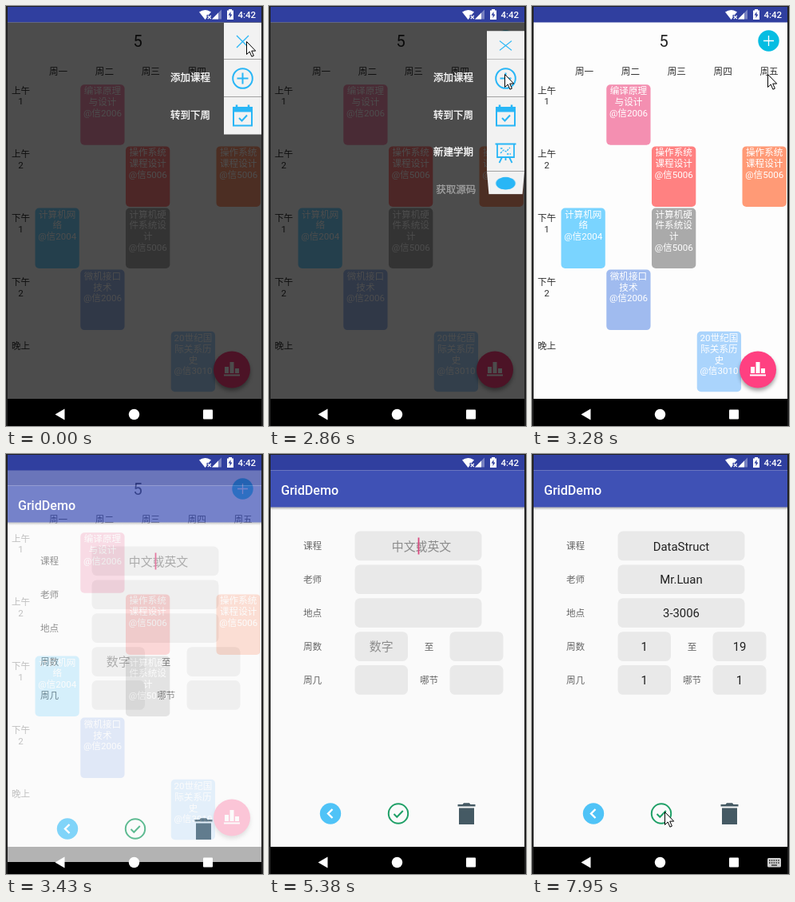
Animation, 322 px wide and 525 px high, one loop 8 s. Source, as an HTML page:

```html
<!DOCTYPE html>
<html lang="zh-CN">
<head>
<meta charset="utf-8">
<title>Timetable</title>
<style>
@property --fold { syntax: "<number>"; inherits: true; initial-value: 0; }
html, body { margin: 0; width: 100%; height: 100%; overflow: hidden; background: #222; }
#stage { position: absolute; left: 0; top: 0; width: 322px; height: 525px; overflow: hidden;
  font-family: Roboto, "Noto Sans CJK SC", "Noto Sans CJK", sans-serif; }
svg { position: absolute; left: 0; top: 0; display: block; overflow: visible; }
text { font-size: 11.6px; }
.mid { text-anchor: middle; }

/* every timeline is 8 s long; 1% = 80 ms */
.t { animation: 8s step-end infinite; }
#dim { fill: rgba(0,0,0,.7); animation-name: dim; }
@keyframes dim { 0% { opacity: 1 } 40% { opacity: .5 } 41%, 100% { opacity: 0 } }

.item { position: absolute; left: 2px; width: 318px; height: 46.5px; }
.face { position: absolute; right: 0; top: 0; width: 47px; height: 46.5px; box-sizing: border-box;
  background: #f2f2f2; border-bottom: 1px solid #a2a2a2; transform-origin: 50% 0;
  transform: perspective(300px) rotateX(calc(var(--fold) * -90deg)); }
.label { position: absolute; right: 64px; top: 0; line-height: 46px; font-size: 12.5px;
  color: #fff; -webkit-text-stroke: .3px #fff; white-space: nowrap;
  opacity: calc(1 - var(--fold)); transform: translateX(calc(var(--fold) * 6px)); }
.face svg { fill: none; stroke: #29b6f6; stroke-width: 2; }
.close .face { transform-origin: 50% 100%; transform: scaleY(calc(1 - var(--fold))); }
.add .face { transform-origin: 100% 50%; transform: perspective(300px) rotateY(calc(var(--fold) * 90deg)); }
.close { animation-name: close }
.add { animation-name: add }
.week { animation-name: week }
.term { animation-name: term }
.code { animation-name: code }
@keyframes close { 0% { --fold: 0 } 35.75% { --fold: .22 } 36.875%, 100% { --fold: 1 } }
@keyframes add { 0% { --fold: 0 } 39.125% { --fold: .45 } 40%, 100% { --fold: 1 } }
@keyframes week { 0% { --fold: 0 } 37.625% { --fold: .15 } 38.375% { --fold: .7 } 39.125%, 100% { --fold: 1 } }
@keyframes term { 0% { --fold: 1 } .75% { --fold: .5 } 1.5% { --fold: 0 }
  36.875% { --fold: .45 } 37.625%, 100% { --fold: 1 } }
@keyframes code { 0% { --fold: 1 } 1.5% { --fold: .9 } 2.25% { --fold: .4 } 3% { --fold: 0 }
  35.75% { --fold: .53 } 36.875%, 100% { --fold: 1 } }

#form { animation-name: enter; }
@keyframes enter {
  0% { opacity: 0; transform: translateY(42px) }
  42.875% { opacity: .72; transform: translateY(19px) }
  43.625% { opacity: .97; transform: translateY(6px) }
  44.375% { opacity: 1; transform: translateY(1px) }
  45.125%, 100% { opacity: 1; transform: none }
}
.empty { animation-name: empty }
.filled { animation-name: filled }
@keyframes empty { 0% { opacity: 1 } 68.25%, 100% { opacity: 0 } }
@keyframes filled { 0% { opacity: 0 } 68.25%, 100% { opacity: 1 } }
.caret { fill: #d9487e }
.first { animation-name: first }
.last { animation-name: last }
@keyframes first { 0%, 54.75%, 67.25% { opacity: 1 } 48.125%, 61%, 68.25%, 100% { opacity: 0 } }
@keyframes last { 0%, 74.25%, 86.625%, 99.375%, 100% { opacity: 0 } 68.25%, 80.75%, 92.75% { opacity: 1 } }

#pointer { animation: move 8s linear infinite, pointer 8s step-end infinite; }
@keyframes pointer { 0%, 73.25%, 100% { opacity: 1 } 42.875% { opacity: 0 } }
@keyframes move {
  0%, 12% { transform: translate(301px, 44px) }
  17.125% { transform: translate(309px, 92px) }
  18.75% { transform: translate(307px, 107px) }
  21.375%, 73.24% { transform: translate(295px, 85px) }
  73.25% { transform: translate(184px, 513px) }
  77.375% { transform: translate(169px, 450px) }
  79.75%, 100% { transform: translate(166px, 447px) }
}
</style>
</head>
<body>
<div id="stage">
  <svg id="page" width="322" height="525">
    <defs>
      <filter id="blur" x="-50%" y="-50%" width="200%" height="200%"><feGaussianBlur stdDeviation="2.5"/></filter>
      <linearGradient id="shade" x2="0" y2="1"><stop stop-opacity=".3"/><stop offset="1" stop-opacity="0"/></linearGradient>
    </defs>
    <rect x="2" y="1" width="318" height="20" fill="#303f9f"/>
    <rect x="2" y="20.5" width="318" height="471" fill="#fdfdfd"/>
    <rect x="2" y="491" width="318" height="34"/>
    <text class="mid" x="165" y="51" style="font-size:20px" fill="#222">5</text>
    <circle cx="296.5" cy="43.5" r="13.2" fill="#05bde2"/>
    <path d="M290 43.5h13M296.5 37v13" stroke="#fff" stroke-width="1.3"/>
    <g id="grid"></g>
    <circle cx="283" cy="458" r="23" opacity=".35" filter="url(#blur)"/>
    <circle cx="283" cy="454.5" r="23" fill="#ff4081"/>
    <path fill="#fff" d="M274 451h5v8h-5zM280.5 445h5v14h-5zM287 453h5v6h-5zM273 460.5h20v2h-20z"/>
    <rect id="dim" class="t" x="2" y="20.5" width="318" height="470.5"/>
  </svg>

  <div id="menu"></div>

  <svg id="form" class="t" width="322" height="525">
    <rect x="2" y="1" width="318" height="20" fill="#303f9f"/>
    <rect x="2" y="20.5" width="318" height="471" fill="#fafafa"/>
    <rect x="2" y="20.5" width="318" height="46" fill="#3f51b5"/>
    <rect x="2" y="66.5" width="318" height="3.5" fill="url(#shade)"/>
    <rect x="2" y="491" width="318" height="34"/>
    <text x="15" y="50.5" style="font-size:16.1px;font-weight:500" fill="#fff">GridDemo</text>
    <g id="fields"></g>
    <rect class="caret t first" x="186.6" y="104.5" width="1.8" height="21"/>
    <rect class="caret t last" x="263.6" y="272" width="1.8" height="21"/>
    <circle cx="77" cy="449.5" r="13.2" fill="#4fc3f7"/>
    <path d="M79.5 444l-5.5 5.5 5.5 5.5" fill="none" stroke="#fff" stroke-width="2.4"/>
    <g fill="none" stroke="#1fa067" stroke-width="2">
      <circle cx="162" cy="449.5" r="12.2"/>
      <path d="M156.5 450l3.8 3.8 7.5-7.8"/>
    </g>
    <path fill="#455a64" d="M236.5 438h6l1.5-1.8h7l1.5 1.8h6v2.4h-22zM238 442.5h19v20.5h-19z"/>
  </svg>

  <svg width="322" height="525">
    <g fill="#fff">
      <path d="M242 7.5Q249.5 2.5 257 7.5L254 11H251.5V14.5L249.5 17z"/>
      <path d="M252.8 12l4 4m0-4l-4 4" stroke="#fff" stroke-width="1.2"/>
      <path d="M258 16.5h12v-12z" opacity=".35"/>
      <path d="M258 16.5h8v-8z"/>
      <path d="M277 5.5h2v-1.5h4v1.5h2v11.5h-8z"/>
      <path d="M281.5 7l-3 4.5h2v3.5l3-4.5h-2z" fill="#303f9f"/>
      <text x="290.5" y="15" style="font-size:11.5px;font-weight:500">4:42</text>
      <path d="M61.5 510.5l12-7v14z"/>
      <circle cx="160.5" cy="510.5" r="6.7"/>
      <rect x="247" y="504.5" width="12" height="12" rx="1"/>
    </g>
    <g class="t filled">
      <rect x="295" y="505" width="17" height="11.5" rx="1.5" fill="#d0d0d0"/>
      <path d="M297 508h13M297 511h13" stroke="#222" stroke-width="1.5" stroke-dasharray="1.5 1.3"/>
      <path d="M300 514h7" stroke="#222" stroke-width="1.3"/>
    </g>
    <path id="pointer" d="M.5.5v16l3.7-3.5 2.7 6.2 2.5-1.1-2.7-6h5z" fill="#fff" stroke="#000"/>
  </svg>
</div>
<script>
const byId = id => document.getElementById(id);
const label = (x, y, s, fill, size = 11.6) =>
  `<text class="mid" x="${x}" y="${y}" fill="${fill}" style="font-size:${size}px">${s}</text>`;

// Timetable
const card = (day, slot, color, lines) => {
  const x = 36.5 + day * 56.75, y = 98.3 + slot * 77.1;
  return `<rect x="${x}" y="${y}" width="55.3" height="75.5" rx="5" fill="${color}"/>` +
    lines.split('/').map((s, i) => label(x + 27.7, y + 12 + i * 13.9, s, '#fff')).join('');
};
byId('grid').innerHTML =
  [...'一二三四五'].map((d, i) => label(65.5 + i * 57.9, 86, '周' + d, '#333')).join('') +
  ['上午/1', '上午/2', '下午/1', '下午/2', '晚上'].map((row, i) =>
    row.split('/').map((s, j) => label(18.5, 109.5 + i * 79.9 + j * 13.8, s, '#333')).join('')).join('') +
  card(1, 0, '#f48fb1', '编译原理/与设计/@信2006') +
  card(2, 1, '#ff8181', '操作系统/课程设计/@信5006') +
  card(4, 1, '#ff9a76', '操作系统/课程设计/@信5006') +
  card(0, 2, '#7ad4ff', '计算机网/络/@信2004') +
  card(2, 2, '#aaaaaa', '计算机硬/件系统设/计/@信5006') +
  card(1, 3, '#a0bbef', '微机接口/技术/@信2006') +
  card(3, 4, '#aad4fc', '20世纪国/际关系历/史/@信3010');

// Popup menu
const items = [
  ['close', '', '<path d="M16 16l15 15m0-15l-15 15" stroke-width="1.3"/>'],
  ['add', '添加课程', '<circle cx="23.5" cy="23.5" r="12.3"/><path d="M16.5 23.5h14M23.5 16.5v14"/>'],
  ['week', '转到下周', '<path d="M12 13h23v22.5h-23z"/><path d="M11 15.5h25" stroke-width="6"/>' +
    '<path d="M16 9.5v5M31 9.5v5" stroke-width="2.5"/><path d="M19 26l3.5 3.5 6.5-7"/>'],
  ['term', '新建学期', '<path d="M10.5 12.5h26M13 12.5v16.5h21v-16.5M19 29l-3.5 7M28 29l3.5 7M23.5 29v4" stroke-width="1.8"/>' +
    '<path d="M17 24l4-4 3 2 5-5M17 18h3M25 25h5" stroke-width="1.3" stroke-dasharray="2.5 1.2"/>'],
  ['code', '获取源码', '<circle cx="23.5" cy="23.5" r="13" fill="#29b6f6" stroke="none"/>']
];
byId('menu').innerHTML = items.map(([name, text, icon], i) =>
  `<div class="item t ${name}" style="top:${20.5 + i * 46.5}px"><span class="label">${text}</span>` +
  `<div class="face"><svg width="47" height="46">${icon}</svg></div></div>`).join('');

// Course form
const rowY = i => 96.5 + i * 41.9;
const field = (x, i, w) => `<rect x="${x}" y="${rowY(i)}" width="${w}" height="36.7" rx="6.5" fill="#e9e9e9"/>`;
const value = (x, i, s, fill = '#222') => label(x, rowY(i) + 24, s, fill, 14.9);
byId('fields').innerHTML =
  ['课程', '老师', '地点', '周数', '周几'].map((s, i) => label(54.5, rowY(i) + 22.6, s, '#666')).join('') +
  [0, 1, 2].map(i => field(107.5, i, 159)).join('') +
  [3, 4].map(i => field(107.5, i, 66.5) + field(226.5, i, 67)).join('') +
  label(200.5, rowY(3) + 22.6, '至', '#666') + label(200.5, rowY(4) + 22.6, '哪节', '#666') +
  `<g class="t empty">${value(191, 0, '中文或英文', '#8c8c8c')}${value(140.7, 3, '数字', '#8c8c8c')}</g>` +
  `<g class="t filled">${['DataStruct', 'Mr.Luan', '3-3006'].map((s, i) => value(187, i, s)).join('')}` +
  value(140.7, 3, '1') + value(260, 3, '19') + value(140.7, 4, '1') + value(260, 4, '1') + '</g>';
</script>
</body>
</html>
```
